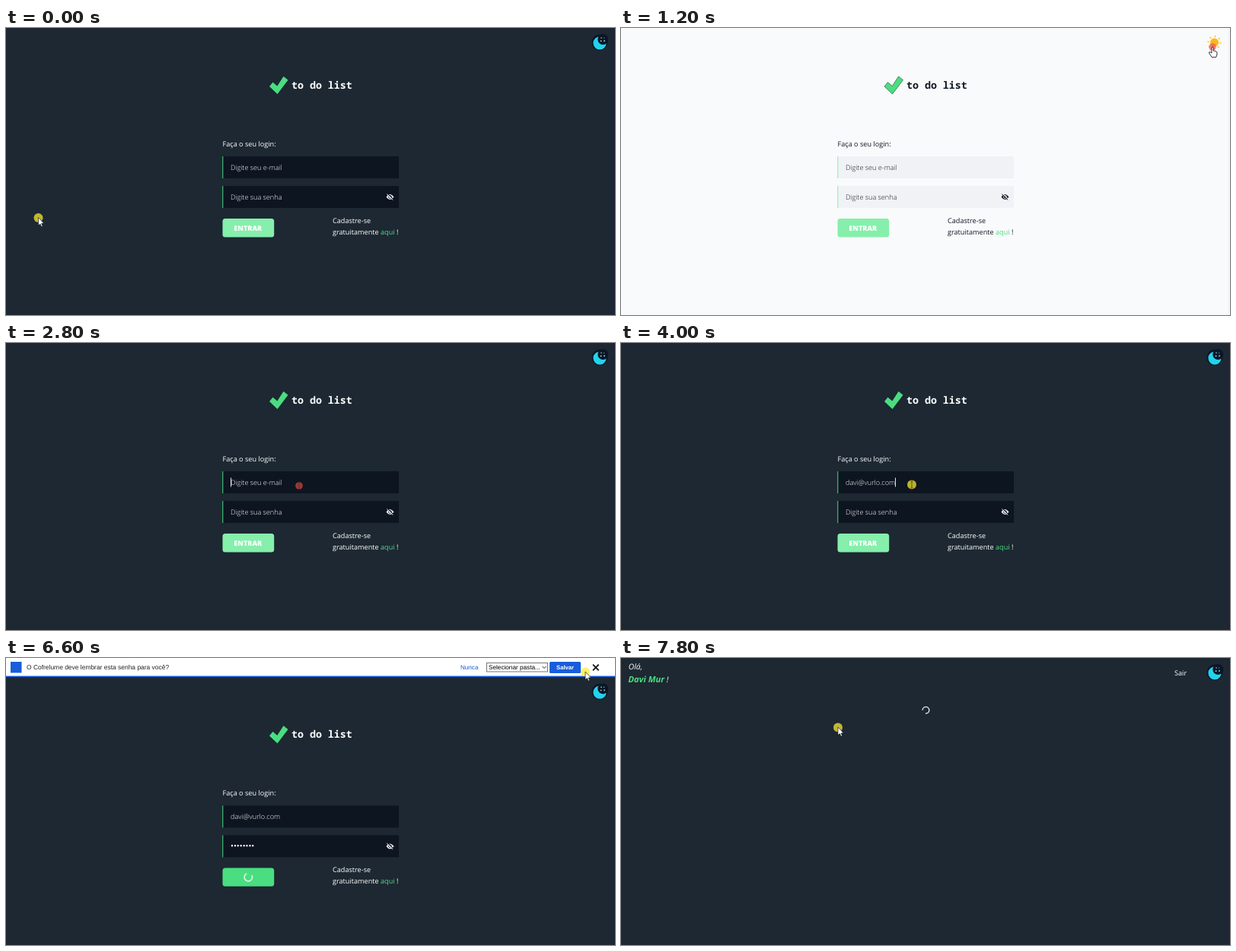
These frames come from a looping animation (800 px wide and 378 px high, 8 s). An HTML page:

```html
<!DOCTYPE html>
<html lang="pt-BR">
<head>
<meta charset="utf-8">
<title>to do list</title>
<style>
  html, body { margin: 0; height: 100%; overflow: hidden; }
  svg {
    --bg: #1d2832; --edge: #1f2536; --field: #0d1520; --ink: #fff; --line: #4ade80; --outline: none;
    display: block; width: 100vw; height: 100vh; background: var(--bg);
    font: 9.15px "Open Sans", "Noto Sans", sans-serif; text-rendering: geometricPrecision;
  }
  svg.light {
    --bg: #f9fafb; --edge: #f4f5f9; --field: #f1f2f6; --ink: #111827; --line: #86efac; --outline: #3d6b50;
  }
  text { fill: var(--ink); white-space: pre; }
  .title { font: bold 13.3px "Noto Sans Mono", "DejaVu Sans Mono", monospace; }
  .field { fill: var(--field); }
  .value { font-weight: 300; }
  .dots { font-size: 10.4px; font-weight: 400; }
  .green { fill: #4ade80; }
  .label { fill: #fff; font-weight: 800; }
  .spin { fill: none; stroke-linecap: butt; }
  #bar text { font: 8.45px "Liberation Sans", Arial, sans-serif; fill: #222; }
  #bar .blue { font-size: 8.1px; fill: #175ddc; }
  #bar .small { font-size: 8.2px; fill: #000; }
  #bar .save { font-size: 7.7px; font-weight: bold; fill: #fff; }
  #hello { font-style: italic; font-size: 10.3px; }
  #hello .name { font-size: 11.2px; font-weight: bold; }
</style>
</head>
<body>
<svg id="stage" viewBox="0 0 800 378" preserveAspectRatio="none">
  <rect x="797" width="3" height="378" fill="var(--edge)"/>

  <g id="page">
    <g id="login">
      <path d="M346 77L350.5 71.5 356.3 76.5 364.5 63.8 370.5 68.5 356.5 87Z" fill="#4ade80" stroke="var(--outline)" stroke-width=".8"/>
      <text class="title" x="375" y="79.7">to do list</text>
      <text x="284.5" y="156">Faça o seu login:</text>

      <rect class="field" x="284.5" y="169" width="231.5" height="29"/>
      <rect x="284.3" y="169" width="1" height="29" fill="var(--line)"/>
      <text id="email" class="value" x="295" y="187"></text>

      <rect class="field" x="284.5" y="208" width="231.5" height="29"/>
      <rect x="284.3" y="208" width="1" height="29" fill="var(--line)"/>
      <text id="password" class="value" x="295" y="226"></text>
      <g transform="translate(504.5 222.5)" fill="var(--ink)">
        <path d="M-5 0Q0-7 5 0Q0 7-5 0Z"/>
        <circle r="2" fill="none" stroke="var(--field)" stroke-width=".9"/>
        <path d="M-3.6-4.4L4.4 3.4" stroke="var(--field)" stroke-width="1.1"/>
        <path d="M-4.2-3.8L3.8 4" stroke="var(--ink)" stroke-width="1"/>
      </g>
      <rect id="caret" width=".9" height="12" fill="var(--ink)"/>

      <rect id="button" x="284.5" y="251" width="67.7" height="24.4" rx="3.5"/>
      <text id="label" class="label" x="299.3" y="266.8">ENTRAR</text>
      <circle id="buttonSpin" class="spin" r="5.2" stroke="#d3f8e0" stroke-width="1.7" stroke-dasharray="24.5 8.17"/>
      <text x="429" y="257">Cadastre-se</text>
      <text x="429" y="271.6">gratuitamente <tspan class="green">aqui</tspan> !</text>
    </g>

    <g id="moon" transform="translate(780 19)">
      <circle r="10.5" fill="#0d1626"/>
      <circle cy=".8" r="8.6" fill="#22d3ee"/>
      <circle cx="4.3" cy="-4" r="7" fill="#0d1626"/>
      <g fill="#8fdcec">
        <circle cx="2" cy="-6" r=".8"/><circle cx="6" cy="-2" r=".9"/>
        <circle cx="1.6" cy="-1.8" r=".9"/><circle cx="5.6" cy="-6" r=".6"/>
      </g>
    </g>
    <g id="sun" transform="translate(779.5 19)">
      <circle r="7.9" fill="none" stroke="#fbbf24" stroke-width="2.6" stroke-dasharray="1.3 4.905"/>
      <circle r="5.5" fill="#fbb81c"/>
    </g>
  </g>

  <g id="home">
    <g id="hello">
      <text x="9.8" y="15">Olá,</text>
      <text x="9.5" y="32.4"><tspan class="name green">Davi Mur</tspan> !</text>
    </g>
    <text x="727" y="23">Sair</text>
    <circle id="homeSpin" class="spin" r="4.3" stroke="#e5e9ee" stroke-width="1.4" stroke-dasharray="20.2 6.8"/>
  </g>

  <g id="bar">
    <rect width="800" height="25" fill="#fff"/>
    <rect y="23.6" width="800" height="1.6" fill="#175ddc"/>
    <rect x="6" y="5" width="14.5" height="14.5" fill="#175ddc"/>
    <text x="27" y="15.2">O Cofrelume deve lembrar esta senha para você?</text>
    <text class="blue" x="597" y="15.2">Nunca</text>
    <rect x="631.5" y="6.5" width="80" height="11.5" fill="#fff" stroke="#767676"/>
    <text class="small" x="634" y="15.2">Selecionar pasta...</text>
    <path d="M704.5 11L707 13.5 709.5 11" fill="none" stroke="#222"/>
    <rect x="714" y="5" width="41" height="15" rx="1.5" fill="#175ddc"/>
    <text class="save" x="723" y="15.2">Salvar</text>
    <path d="M771 8.7L778.6 16.3M778.6 8.7L771 16.3" stroke="#111" stroke-width="1.8"/>
  </g>

  <g id="cursor">
    <circle id="halo" r="6"/>
    <path id="arrow" d="M0-.5V10.3L2.4 8.1 4 11.7 5.7 11 4.1 7.5H7.4Z" fill="#fff" stroke="#000" stroke-width=".6"/>
    <path id="hand" d="M-1.1 1a1.1 1.1 0 0 1 2.2 0V5l1.7.2 1.9.6 1.2 1V10l-1.1 3.4H-1L-3.8 9 -4.6 7l1.4-.5L-1.1 8Z" fill="#fff" stroke="#000" stroke-width=".8"/>
    <path id="beam" d="M-1.5-4.5H1.5M0-4.5V4.5M-1.5 4.5H1.5" stroke="#3a3a16" stroke-width=".8"/>
  </g>
</svg>
<script>
const LOOP = 8000, STEP = 200;
const EMAIL = "davi@vurlo.com";
// pointer path: time, x, y
const PATH = [
  [0, 42.5, 250], [200, 60, 246], [800, 610, 80], [1000, 772, 24], [1200, 777, 25], [1400, 777, 25],
  [1800, 463.5, 165.5], [2000, 440, 220], [2400, 432, 260], [2800, 385, 188], [3400, 382, 186],
  [4000, 382, 186.5], [4200, 382, 215], [4400, 383, 222], [4800, 392, 223], [5200, 502, 221.5],
  [5400, 502, 221.5], [5600, 328, 265], [5800, 560, 150], [6000, 781, 27], [6200, 770, 24],
  [6600, 761, 18.5], [6800, 774, 13], [7000, 675, 155], [7200, 660, 344], [7400, 560, 290],
  [7800, 285, 91.5], [8000, 285, 91.5]
];
const CLICKS = [1200, 2800, 4400, 5600, 6800];

const parts = {};
document.querySelectorAll("[id]").forEach(el => parts[el.id] = el);

const show = (name, on) => parts[name].style.display = on ? "" : "none";
const within = (t, from, to) => t >= from && t < to;
const place = (name, x, y, angle = 0) =>
  parts[name].setAttribute("transform", `translate(${x} ${y}) rotate(${angle})`);

function pointerAt(t) {
  const i = PATH.findIndex(([time]) => time > t);
  const [t0, x0, y0] = PATH[i - 1], [t1, x1, y1] = PATH[i];
  const k = (t - t0) / (t1 - t0);
  return [x0 + (x1 - x0) * k, y0 + (y1 - y0) * k];
}

function pointerKind(x, y, onLogin) {
  const inside = (l, top, r, b) => x > l && x < r && y > top && y < b;
  if (inside(770, 20, 790, 30)) return "hand";
  if (!onLogin) return "arrow";
  if (inside(498, 216, 511, 229) || inside(284, 251, 352, 275)) return "hand";
  return inside(284, 169, 516, 198) || inside(284, 208, 516, 237) ? "beam" : "arrow";
}

function typed(t, start, duration, text) {
  const k = Math.min(1, Math.max(0, (t - start) / duration));
  return text.slice(0, Math.floor(k * text.length));
}

function drawFields(t) {
  const email = typed(t, 2800, 1000, EMAIL);
  const password = typed(t, 4400, 400, "••••••••");
  parts.email.textContent = email || "Digite seu e-mail";
  parts.password.textContent = password || "Digite sua senha";
  parts.password.classList.toggle("dots", password !== "");

  const onEmail = within(t, 2800, 4400), onPassword = within(t, 4400, 5600);
  show("caret", onEmail || onPassword);
  const value = onEmail ? email : password;
  const width = value ? parts[onEmail ? "email" : "password"].getComputedTextLength() : 0;
  parts.caret.setAttribute("x", 295 + width);
  parts.caret.setAttribute("y", onEmail ? 177.5 : 216);
}

function draw(t) {
  const light = within(t, 1200, 1600);
  const onLogin = t < 7400;
  const loading = t >= 5600;
  const bar = within(t, 6200, 7000);
  const angle = (t - 7800) * 0.8 - 180;

  parts.stage.classList.toggle("light", light);
  show("moon", !light);
  show("sun", light);
  show("login", onLogin);
  show("home", !onLogin);
  show("bar", bar);
  place("page", 0, bar ? 25.4 : 0);

  if (onLogin) drawFields(t);
  parts.button.setAttribute("fill", t < 5000 ? "#86efac" : "#4ade80");
  show("label", !loading);
  show("buttonSpin", loading);
  place("buttonSpin", 318.3, 263.3, angle + 30);
  place("homeSpin", 400.5, 68.7, angle);

  const [x, y] = pointerAt(t);
  const kind = pointerKind(x, y, onLogin);
  place("cursor", x, y);
  for (const name of ["arrow", "hand", "beam"]) show(name, name === kind);
  const pressed = CLICKS.includes(t);
  parts.halo.setAttribute("r", pressed ? 4.8 : 6);
  parts.halo.setAttribute("fill", pressed ? "rgba(240,70,70,.65)" : "rgba(255,238,50,.72)");
}

function tick() {
  const t = performance.now() % LOOP;
  draw(Math.floor(t / STEP) * STEP);
  requestAnimationFrame(tick);
}
tick();
</script>
</body>
</html>
```
